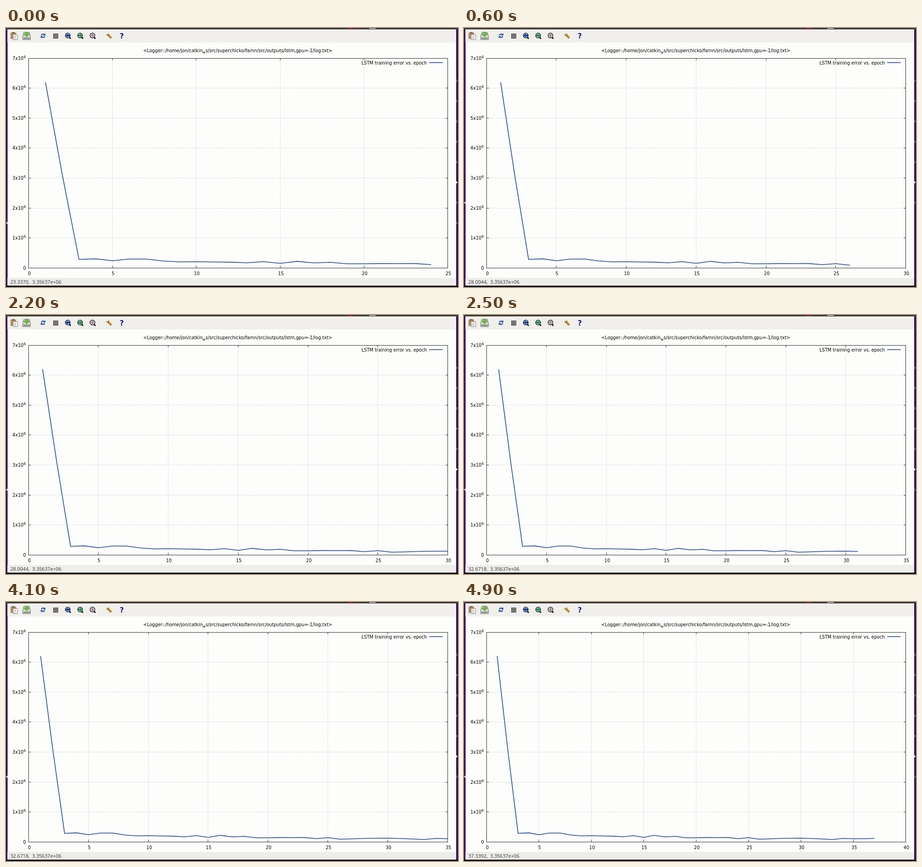
Animation of 988 by 567 pixels, one loop 5 s. Source, as an HTML page with a canvas:

```html
<!DOCTYPE html>
<html>
<head>
<meta charset="utf-8">
<style>
html, body { margin: 0; width: 100%; height: 100%; overflow: hidden; background: #fdfdfb; }
canvas { display: block; }
</style>
</head>
<body>
<canvas id="stage" width="988" height="567"></canvas>
<script>
const g = document.getElementById('stage').getContext('2d');
const LEFT = 49.5, RIGHT = 966, TOP = 66, BASE = 525.4, UNIT = 65.62;
const INK = '#000', FRAME = '#2c2c2c', BLUE = '#1f479a', GRID = '#b2b2d2', PURPLE = '#37125a';
const SIZE = 9.72;

// training error per epoch, in thousands
const errors = [6200, 3130, 287, 305, 242, 299, 299, 235, 205, 212, 200, 195, 174, 212,
  155, 222, 169, 189, 140, 140, 149, 148, 149, 113, 143, 94, 105, 120, 125, 128, 116,
  102, 82, 120, 108, 110, 120];

function rect(color, x, y, w, h) {
  g.fillStyle = color;
  g.fillRect(x, y, w, h);
}

function path(points, color, width = 1, fill) {
  g.beginPath();
  points.forEach(([x, y]) => g.lineTo(x, y));
  if (fill) {
    g.fillStyle = fill;
    g.fill();
  }
  if (color) {
    g.strokeStyle = color;
    g.lineWidth = width;
    g.stroke();
  }
}

function dotted(points) {
  g.setLineDash([1.2, 2.6]);
  path(points, GRID);
  g.setLineDash([]);
}

function arc(x, y, r, color, width, from = 0, to = 7, fill) {
  g.beginPath();
  g.arc(x, y, r, from, to);
  if (fill) {
    g.fillStyle = fill;
    g.fill();
  }
  g.strokeStyle = color;
  g.lineWidth = width;
  g.stroke();
}

function text(s, x, y, align = 'left', size = SIZE) {
  g.font = `${size}px "DejaVu Sans", sans-serif`;
  g.textAlign = align;
  g.fillStyle = INK;
  g.fillText(s, x, y);
  return x + g.measureText(s).width;
}

function zoomIcon(x) {
  path([[x + 3, 20], [x + 6.5, 23.5]], '#111', 2.6);
  arc(x, 16.5, 5.3, '#15151c', 1.4, 0, 7, '#dfe6f2');
}

function zoomArrow(x, color, dir) {
  zoomIcon(x);
  path([[x - 5 * dir, 16.5], [x, 12], [x, 14.3], [x + 5 * dir, 14.3],
    [x + 5 * dir, 18.7], [x, 18.7], [x, 21]], null, 1, color);
}

function toolbar() {
  rect('#f0efeb', 3, 3, 981, 28.5);

  // paste
  rect('#b58b5a', 10, 10, 12, 14);
  rect('#6e6a64', 13, 9, 6, 3);
  rect('#fafafa', 15, 14, 10, 11);
  g.strokeStyle = '#888';
  g.lineWidth = 1;
  g.strokeRect(15.5, 14.5, 10, 11);
  for (let y = 17; y < 24; y += 2) rect('#bbb', 17, y, 6, 1);

  // export
  path([[39, 9.5], [51, 9.5], [53.5, 19], [53.5, 25.5], [36.5, 25.5], [36.5, 19], [39, 9.5]],
    '#666', 1, '#d4dccb');
  rect('#8c8c8c', 38, 21, 14, 3);
  path([[42, 9], [48, 9], [48, 13], [51.5, 13], [45, 19.5], [38.5, 13], [42, 13]],
    '#3f8a2b', 0.8, '#6fb844');

  // replot
  arc(81, 17, 3.8, '#164a92', 2, 3.4, 5.7);
  arc(81, 17, 3.8, '#164a92', 2, 0.3, 2.6);
  path([[86, 11.5], [86, 16.5], [81, 16.5]], null, 1, '#164a92');
  path([[76, 22.5], [76, 17.5], [81, 17.5]], null, 1, '#164a92');

  // grid
  for (let i = 0; i < 4; i++) {
    rect('#111', 104 + i * 3, 12, 1, 11);
    rect('#111', 103, 13 + i * 3, 11, 1);
  }

  zoomArrow(135, '#0d3fae', 1);
  zoomArrow(162, '#159445', -1);
  zoomIcon(189);
  g.strokeStyle = '#9a4a48';
  g.strokeRect(187.5, 14.5, 3, 4);

  // wrench
  path([[222.5, 14.5], [230, 22]], '#7b4c08', 4);
  path([[222.5, 14.5], [229.5, 21.5]], '#e5a31e', 2.4);
  arc(222.5, 14, 2.2, '#a06a10', 1.6, 5.2, 9.8);

  g.font = 'bold 15px "DejaVu Sans", sans-serif';
  g.textAlign = 'center';
  g.fillStyle = '#12128c';
  g.fillText('?', 253, 22.5);
}

function desktop(early) {
  rect('#fdfdfb', 0, 0, 988, 567);
  rect(PURPLE, 0, 0, 3.5, 567);
  rect(PURPLE, 984, 0, 4, 567);
  rect('#3c3934', 0, 0, 988, 3);
  rect('#c4183c', 748, 0, 11, 2);
  rect('#d8d8d8', 794, 0, 14, 1.5);
  toolbar();
  rect('#eeedea', 3, 547, 981, 17);
  rect('#0a0a0c', 0, 564, 988, 3);

  for (let i = 0; i < (early ? 8 : 7); i++) {
    const y = 115.5 + i * 44.5;
    path([[983.5, y - 3], [987, y], [983.5, y + 3]], '#b9aec6', 1, i == 5 ? '#fff' : null);
  }
  const y = early ? 427 : 382.5;
  path([[3.5, y - 3], [0, y], [3.5, y + 3]], null, 1, '#e8e4ec');
}

function tick(x, y, dx, dy) {
  path([[x, y], [x + dx, y + dy]], FRAME);
}

function axes(xmax) {
  const snap = v => Math.floor(v) + 0.5;
  for (let i = 0; i <= 7; i++) {
    const y = snap(BASE - i * UNIT);
    if (i % 7) dotted([[LEFT, y], [RIGHT, y]]);
    tick(LEFT, y, 5, 0);
    tick(RIGHT, y, -5, 0);
    if (i) {
      const end = text(i + 'x10', 14, y + 3.5);
      text('6', end + 0.3, y - 0.5, 'left', SIZE * 0.8);
    } else {
      text('0', 43.8, y + 3.7, 'right');
    }
  }
  for (let v = 0; v <= xmax; v += 5) {
    const x = snap(LEFT + (RIGHT - LEFT) * v / xmax - 0.3);
    // grid lines stop below the legend
    if (v % xmax) dotted([[x, x > 770 && x < 960 ? 86 : TOP], [x, BASE]]);
    tick(x, BASE, 0, -5);
    tick(x, TOP, 0, 5);
    text(v, x + 1.5, 541, 'center');
  }
  g.strokeStyle = FRAME;
  g.lineWidth = 1;
  g.strokeRect(LEFT, 66.5, 916, 459);
}

function title() {
  let x = text('<Logger::/home/jon/catkin', 300, 53);
  x = text('w', x, 55.5, 'left', SIZE * 0.8);
  text('s/src/superchicko/farnn/src/outputs/lstm,gpu=-1/log.txt>', x, 53);
}

function draw(time) {
  const t = Math.floor(time % 5000 / 100) * 100;
  const epochs = 26 + Math.floor((t - 540) / 390);
  const xmax = Math.ceil(epochs / 5) * 5;

  desktop(t < 600);
  title();
  axes(xmax);
  text('LSTM training error vs. epoch', 920, 80, 'right');
  path([[925, 75.7], [954.5, 75.7]], BLUE, 1.6);
  g.lineJoin = 'round';
  path(errors.slice(0, epochs).map((e, i) => [
    LEFT + (RIGHT - LEFT) * (i + 1) / xmax,
    BASE - e / 1000 * UNIT
  ]), BLUE, 1.6);

  g.font = '10.7px "Open Sans", sans-serif';
  g.textAlign = 'left';
  g.fillStyle = '#333';
  g.fillText((xmax * 0.93348).toFixed(4) + ',  3.35637e+06', 9.5, 560);
}

function loop() {
  draw(performance.now());
  requestAnimationFrame(loop);
}
loop();
</script>
</body>
</html>
```
